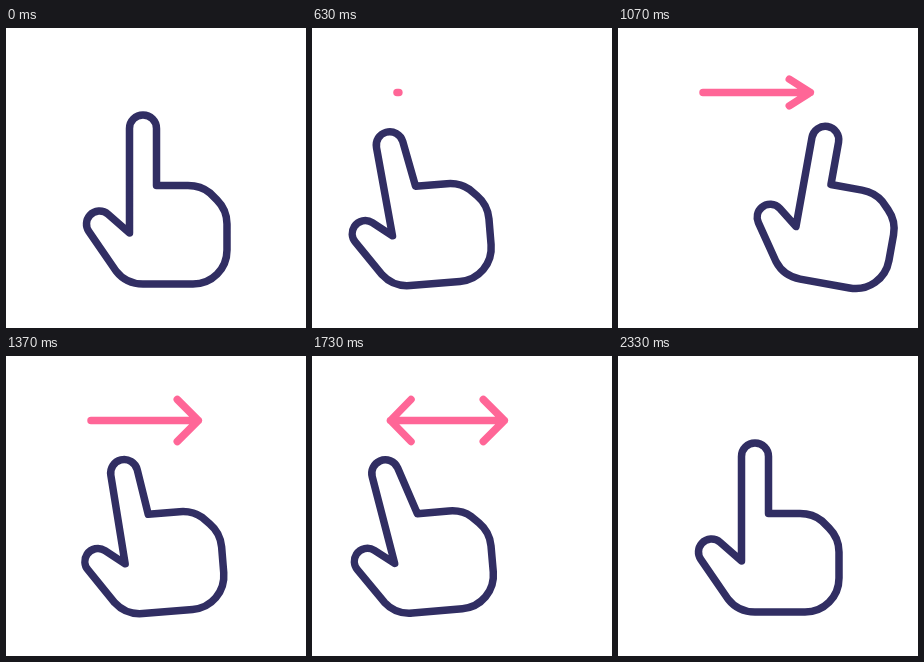
An HTML page with a canvas for the animation above (2360 ms loop, 300 by 300 pixels).

```html
<!DOCTYPE html>
<html lang="en">
<head>
<meta charset="utf-8">
<title>Swipe gesture</title>
<style>
  html, body { margin: 0; width: 100%; height: 100%; overflow: hidden; background: #fff; }
  canvas { display: block; width: 300px; height: 300px; }
</style>
</head>
<body>
<canvas id="stage"></canvas>
<script>
const LOOP = 2360;
const NAVY = '#312e63';
const PINK = '#ff6697';

const canvas = document.getElementById('stage');
const ctx = canvas.getContext('2d');
const dpr = window.devicePixelRatio || 1;
canvas.width = canvas.height = 300 * dpr;

const progress = (t, from, to) => Math.min(1, Math.max(0, (t - from) / (to - from)));

// Smooth rise from 0 to 1.
function ease(t, from, to) {
  const p = progress(t, from, to);
  return p * p * (3 - 2 * p);
}

// Smooth bump from 0 up to 1 and back.
const hop = (t, from, to) => Math.sin(Math.PI * progress(t, from, to)) ** 2;

// The hand goes left, swipes right, swipes back left, then overshoots home.
function handPose(t) {
  const out = ease(t, 0, 590);
  const swipe = ease(t, 590, 1075);
  const back = ease(t, 1075, 1610);
  const home = ease(t, 1615, 2150);
  const settle = ease(t, 2150, 2330);
  const press = ease(t, 170, 560) - ease(t, 1750, 2130);
  const flick = swipe - ease(t, 1075, 1400);
  return {
    press,
    x: -45 * out + 99.5 * swipe - 101.5 * back + 51 * home - 4 * settle,
    y: 3 * press - 9.5 * flick - 5.5 * (hop(t, 0, 500) + hop(t, 1660, 2330)),
    turn: 15.2 * flick - 5 * press,
    sway: 9 * (swipe - ease(t, 230, 600)) + 15 * (ease(t, 1720, 2170) - ease(t, 1100, 1660))
  };
}

// Round finger end whose sides run tangentially from one point to another.
function cap(cx, cy, r, from, to) {
  const tangent = ([x, y], side) =>
    Math.atan2(y - cy, x - cx) + side * Math.acos(r / Math.hypot(x - cx, y - cy));
  ctx.arc(cx, cy, r, tangent(from, -1), tangent(to, 1), true);
}

function drawHand(t) {
  const { x, y, turn, sway, press } = handPose(t);
  const crook = [0, 0], wrist = [-13.5, 38], knuckle = [27, -47.5];
  ctx.save();
  ctx.translate(123.5 + x, 205 + y);
  ctx.rotate(turn * Math.PI / 180);
  ctx.beginPath();
  ctx.moveTo(...crook);
  cap(-30 + 3 * press, -9 + 4.5 * press, 13, crook, wrist);
  ctx.lineTo(...wrist);
  ctx.bezierCurveTo(-6.5, 47, 2.5, 51, 13.5, 51);
  ctx.lineTo(63.5, 51);
  ctx.bezierCurveTo(82.5, 51, 97.5, 36, 97.5, 17);
  ctx.lineTo(97.5, -9);
  ctx.bezierCurveTo(97.5, -18, 93.5, -27, 87.5, -33);
  ctx.lineTo(80.5, -40);
  ctx.bezierCurveTo(74.5, -45, 66.5, -47.5, 58.5, -47.5);
  ctx.lineTo(...knuckle);
  cap(13.5 + sway, -104.5 + 14 * press, 13.5, knuckle, crook);
  ctx.closePath();
  ctx.lineWidth = 7.5;
  ctx.strokeStyle = NAVY;
  ctx.stroke();
  ctx.restore();
}

function arrowHead(x, y, dx, open) {
  if (!open) return;
  ctx.moveTo(x + dx, y - 21 * open);
  ctx.lineTo(x, y);
  ctx.lineTo(x + dx, y + 21 * open);
}

function drawArrow(t) {
  if (t < 600) return;
  const y = 64.5;
  const openL = ease(t, 1550, 1670);
  const openR = ease(t, 1000, 1120);
  const left = 85 - 6.5 * openL;
  const right = 85.5 + 106.8 * ease(t, 600, 1060);
  ctx.globalAlpha = 1 - ease(t, 2150, 2290);
  ctx.beginPath();
  ctx.moveTo(left, y);
  ctx.lineTo(right, y);
  arrowHead(right, y, -21, openR);
  arrowHead(left, y, 20.5, openL);
  ctx.lineWidth = 7.5;
  ctx.strokeStyle = PINK;
  ctx.stroke();
  ctx.globalAlpha = 1;
}

const start = performance.now();

function frame() {
  const t = (performance.now() - start) % LOOP;
  ctx.setTransform(dpr, 0, 0, dpr, 0, 0);
  ctx.fillStyle = '#fff';
  ctx.fillRect(0, 0, 300, 300);
  ctx.lineCap = ctx.lineJoin = 'round';
  drawArrow(t);
  drawHand(t);
  requestAnimationFrame(frame);
}
frame();
</script>
</body>
</html>
```
